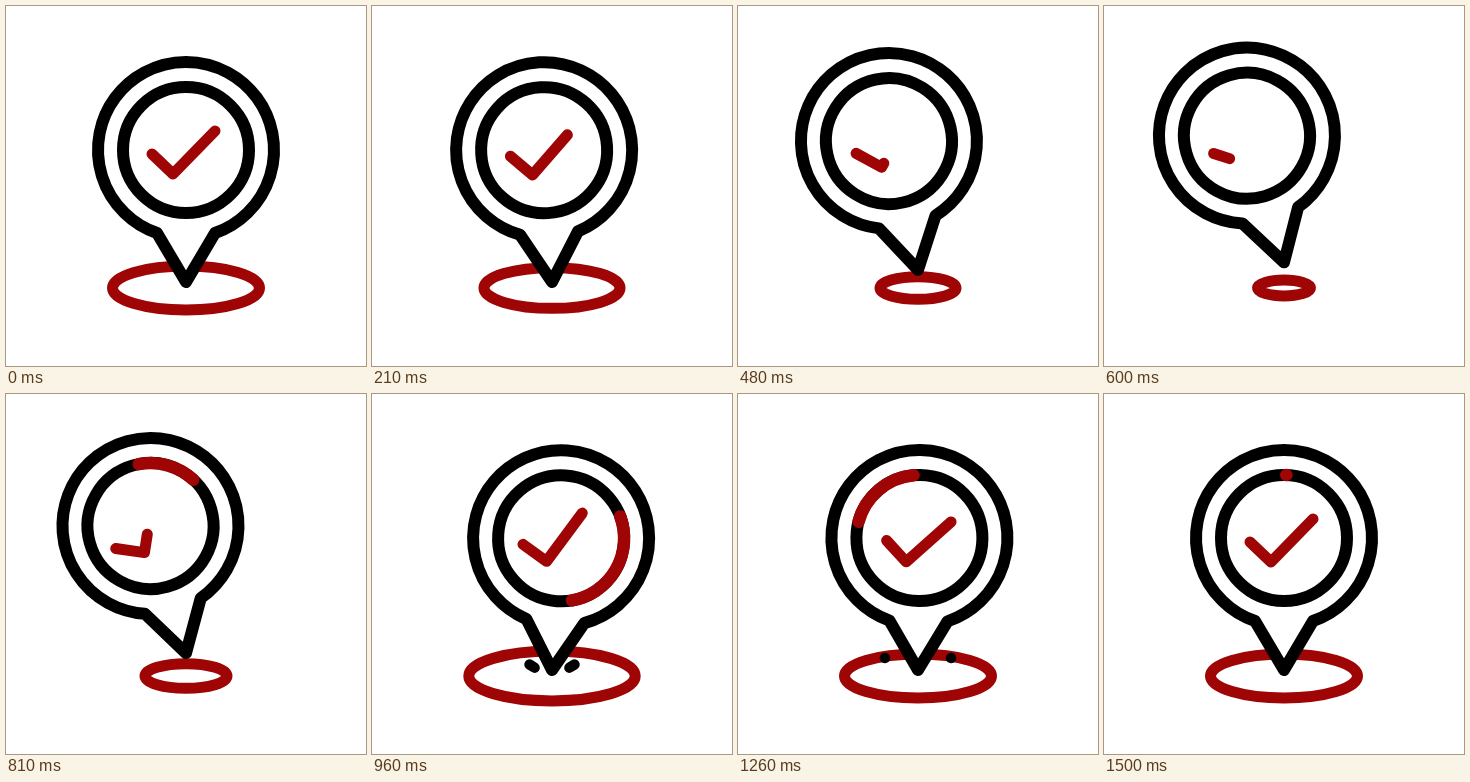
An HTML page for the animation above (1530 ms loop, 360x360 px).

```html
<!DOCTYPE html>
<html lang="en">
<head>
<meta charset="utf-8">
<title>Location check</title>
<style>
  html, body { margin: 0; width: 100%; height: 100%; overflow: hidden; background: #fff; }
  svg { display: block; width: 100vw; height: 100vh; }
  svg * { stroke-linecap: round; stroke-linejoin: round; }
  .red { stroke: #a00505; fill: none; stroke-width: 11; }
  .black { stroke: #000; fill: none; stroke-width: 12; }
</style>
</head>
<body>
<svg viewBox="0 0 360 360">
  <ellipse id="ring" class="red" cx="180" cy="282"/>
  <!-- pin coordinates: the tip is the origin -->
  <g id="pin">
    <path class="black" style="fill:#fff" d="M29-49A88 88 0 1 0-29-49L0 0Z"/>
    <circle class="black" cy="-132" r="63"/>
    <path id="arc" class="red" style="stroke-width:12.5"/>
    <path id="check" class="red"/>
  </g>
  <path id="sparks" class="black" style="stroke-width:10.5"/>
</svg>
<script>
const LOOP = 1530, STEP = 30;
const $ = id => document.getElementById(id);
const ring = $('ring'), pin = $('pin'), arc = $('arc'), check = $('check'), sparks = $('sparks');

const smooth = u => (u = Math.min(1, Math.max(0, u)), u * u * (3 - 2 * u));
const ease = (t, a, b) => smooth((t - a) / (b - a));
const mix = (a, b, k) => a + (b - a) * k;

// Eased value through [time, value] keys
function track(t, keys) {
  let v = keys[0][1];
  for (let i = 1; i < keys.length; i++) {
    const [a] = keys[i - 1], [b, to] = keys[i];
    if (t > a) v = mix(v, to, ease(t, a, b));
  }
  return v;
}

const TILT = [[0, 0], [765, -18.5], [965, 4], [1140, -3.5], [1310, 1.7], [1470, 0]];
const LIFT = [[240, 276], [680, 254.5], [750, 254.5], [950, 276]];
const TICK_TURN = [[390, 0], [825, -20], [1175, 5], [1400, 0]];
const TICK_LEN = [[103, 1], [674, 0.15], [964, 1]];
const SCALE = [[82, 1], [714, 0.3], [975, 1.14], [1125, 1]];

function arcPoint(deg) {
  const a = (deg + 2) * Math.PI / 180;
  return `${63 * Math.sin(a)} ${-132 - 63 * Math.cos(a)}`;
}

function arcPath(t) {
  if (t < 645 || t > 1515) return '';
  const a = 360 * ease(t, 774, 1468);
  const b = Math.max(a + 0.2, 360 * ease(t, 640, 1320));
  return `M${arcPoint(a)}A63 63 0 ${b - a > 180 ? 1 : 0} 1 ${arcPoint(b)}`;
}

// Check mark around its elbow, trimmed from the far end
function tickPath(k) {
  const arm = 29, total = 89, len = k * total;
  const s = Math.min(1, len / arm);
  let d = `M-21-20L${-21 + 21 * s} ${-20 + 20 * s}`;
  if (len > arm) {
    const r = (len - arm) / (total - arm);
    d += `L${42 * r} ${-43 * r}`;
  }
  return d;
}

function sparkPath(t) {
  if (t < 900 || t >= 1290) return '';
  const a = ease(t, 880, 1120), b = Math.max(a + 0.005, ease(t, 880, 1040));
  const at = (side, k) => `${180 + side * mix(12, 33, k)} ${mix(277, 264, k)}`;
  return [-1, 1].map(s => `M${at(s, a)}L${at(s, b)}`).join('');
}

function draw(t) {
  const scale = track(t, SCALE);
  ring.setAttribute('rx', 73.5 * scale);
  ring.setAttribute('ry', 22 * scale);
  pin.setAttribute('transform', `translate(180 ${track(t, LIFT)}) rotate(${track(t, TILT)})`);
  check.setAttribute('transform', `translate(-13 -108) rotate(${track(t, TICK_TURN)})`);
  check.setAttribute('d', tickPath(track(t, TICK_LEN)));
  arc.setAttribute('d', arcPath(t));
  sparks.setAttribute('d', sparkPath(t));
}

const start = performance.now();
function tick() {
  const t = (performance.now() - start) % LOOP;
  draw(Math.floor(t / STEP) * STEP);
  requestAnimationFrame(tick);
}
tick();
</script>
</body>
</html>
```
